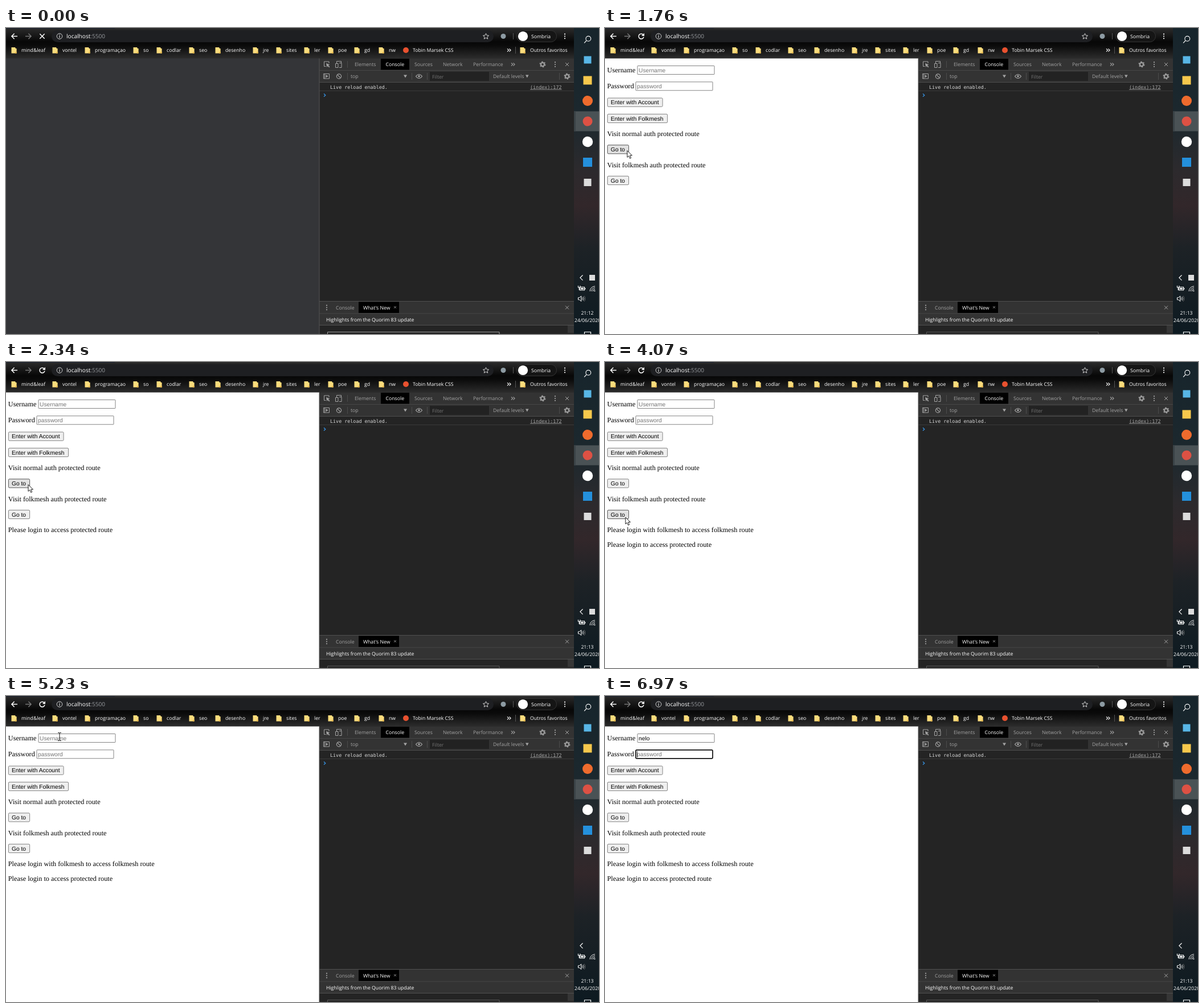
An HTML page that plays this animation: 1041x538 px, repeating every 8000 ms.

```html
<!DOCTYPE html>
<html lang="pt">
<head>
<meta charset="utf-8">
<title>Login routes</title>
<style>
html, body { margin: 0; width: 100%; height: 100%; overflow: hidden; background: #242424; }
svg { display: block; width: 100vw; height: 100vh; }
text { white-space: pre; text-rendering: geometricPrecision; }
.ui { font: 8.7px "Open Sans", "Noto Sans", sans-serif; }
.url { font: 10.1px "Open Sans", "Noto Sans", sans-serif; }
.mono { font: 8.4px "DejaVu Sans Mono", monospace; }
.page { font: 12.25px "Liberation Serif", "Times New Roman", serif; }
.form { font: 10.21px "Liberation Sans", Arial, sans-serif; }
</style>
</head>
<body>
<svg id="stage" viewBox="0 0 1041 538" preserveAspectRatio="none">
  <defs>
    <linearGradient id="toolbar" x2="0" y2="1">
      <stop stop-color="#2b2b2b"/><stop offset=".45" stop-color="#070707"/>
      <stop offset=".58" stop-color="#0b0b0b"/><stop offset="1" stop-color="#2c2c2c"/>
    </linearGradient>
    <linearGradient id="taskbar" x2="0" y2="1">
      <stop stop-color="#17252c"/><stop offset=".3" stop-color="#1c282e"/>
      <stop offset=".46" stop-color="#2c2a2d"/><stop offset=".58" stop-color="#32272a"/>
      <stop offset=".72" stop-color="#1d2226"/><stop offset="1" stop-color="#0d1a21"/>
    </linearGradient>
  </defs>
  <g id="page"></g>
  <g id="browser"></g>
  <g id="devtools"></g>
  <g id="desktop"></g>
  <g id="pointer"></g>
</svg>
<script>
const LOOP = 8000;
const $ = id => document.getElementById(id);

const rect = (x, y, w, h, fill, extra = "") =>
  `<rect x="${x}" y="${y}" width="${w}" height="${h}" fill="${fill}" ${extra}/>`;
const text = (x, y, str, cls = "ui", fill = "#fff", extra = "") =>
  `<text x="${x}" y="${y}" class="${cls}" fill="${fill}" ${extra}>${str.replace(/&/g, "&amp;")}</text>`;
const circle = (x, y, r, fill, extra = "") =>
  `<circle cx="${x}" cy="${y}" r="${r}" fill="${fill}" ${extra}/>`;
const line = (d, stroke, width = 1, fill = "none") =>
  `<path d="${d}" stroke="${stroke}" stroke-width="${width}" fill="${fill}"/>`;
const cross = (x, y, r, color, width = 1) =>
  line(`M${x - r} ${y - r}l${2 * r} ${2 * r}m0 ${-2 * r}l${-2 * r} ${2 * r}`, color, width);
const dots = (x, y, color, gap = 3.8) =>
  [-gap, 0, gap].map(dy => circle(x, y + dy, 1.1, color)).join("");
const gear = (x, y) =>
  circle(x, y, 3.1, "none", 'stroke="#9a9a9a" stroke-width="2.3"') +
  circle(x, y, 4.8, "none", 'stroke="#9a9a9a" stroke-width="1.4" stroke-dasharray="2.5 2.5265"');
const chevrons = (x, y, color) =>
  line(`M${x - 3} ${y - 2.6}l2.7 2.6l-2.7 2.6m3.4 -5.2l2.7 2.6l-2.7 2.6`, color, 1.1);
const folder = x => `<path d="M${x - 4.5} 34h6.5l1 2h1.6v8.6h-9.1z" fill="#fbdc7c"/>` +
  rect(x + 2, 42, 2.6, 2.6, "#e9b94d");
const divider = (x, y) => line(`M${x} ${y - 6}v12`, "#4c4c4c");

function drawBrowser() {
  const bookmarks = [["mind&leaf", 27], ["vontel", 99], ["programaçao", 156], ["so", 241],
    ["codlar", 282], ["seo", 339], ["desenho", 385], ["jre", 451], ["sites", 492],
    ["ler", 541], ["poe", 583], ["gd", 629], ["nw", 672], ["Outros favoritos", 920]];
  $("browser").innerHTML =
    rect(0, 0, 997, 53.5, "url(#toolbar)") +
    rect(0, 0, 191, 1, "#18202e") +
    rect(80, 4, 776, 21, "#1e1f22", 'rx="10.5"') +
    line("M20 14.5H10M14.6 9.8L9.9 14.5l4.7 4.7", "#fff", 1.5) +
    line("M34 14.5h10M39.4 9.8l4.7 4.7l-4.7 4.7", "#777", 1.5) +
    `<g id="stop">${cross(63.5, 14.5, 4.2, "#fff", 1.5)}</g>` +
    `<g id="reload">${line("M67.2 12A4.5 4.5 0 1 0 68 15.6", "#fff", 1.5)}
      <path d="M69 9v5h-5z" fill="#fff"/></g>` +
    circle(94, 14.5, 4.8, "none", 'stroke="#d5d5d5"') +
    rect(93.4, 13.6, 1.2, 3.7, "#ddd") + rect(93.4, 11.5, 1.2, 1.2, "#ddd") +
    text(106, 18, 'localhost<tspan fill="#96999d">:5500</tspan>', "url") +
    line("M842.5 9.6l1.5 3.3l3.6 .4l-2.7 2.4l.8 3.5l-3.2 -1.9l-3.2 1.9l.8 -3.5l-2.7 -2.4l3.6 -.4z", "#d0d0d0") +
    circle(873, 14.5, 4.5, "#8d9ba3") +
    line("M890.5 9v11", "#555") +
    rect(896.5, 4.5, 70, 20, "#151515", 'rx="10" stroke="#343434"') +
    circle(907.5, 14.5, 8.6, "#fff") +
    text(922, 17.7, "Sombria") + dots(981, 14.5, "#fff") +
    bookmarks.map(([name, x]) => folder(x - 13) + text(x, 42, name)).join("") +
    circle(702, 39, 5, "#e8512f") + text(714, 42, "Tobin Marsek CSS") +
    chevrons(883, 39, "#fff") + line("M894.5 33v12", "#555");
}

function drawDevtools() {
  const gray = "#a3a3a3";
  const tabs = [["Elements", 612], ["Console", 666.5], ["Sources", 717], ["Network", 767], ["Performance", 820]];
  $("devtools").innerHTML =
    rect(550, 53.5, 447, 484.5, "#242424") +
    rect(550, 53.5, 447, 42, "#333") +
    rect(550, 74, 447, 1, "#474747") + rect(550, 95, 447, 1, "#4c4c4c") +
    rect(658, 54, 50, 19.5, "#000") +
    tabs.map(([name, x]) => text(x, 67.4, name, "ui", name === "Console" ? "#fff" : gray)).join("") +
    line("M561.5 67.5h-3v-8.5h8.5v3", gray) +
    `<path d="M562 62l6.5 2.6l-2.7 1l2.6 2.7l-1.2 1.2l-2.6 -2.7l-1.1 2.5z" fill="${gray}"/>` +
    line("M580.5 62v-3.5h8v3M578.5 62.5h4.5v7h-4.5zM585 69.5h4v-8h-4", gray) +
    divider(599.5, 64) + chevrons(890, 64, gray) + gear(942, 64) +
    dots(964, 64, gray) + cross(985, 64, 3, gray) +
    // console toolbar
    line("M557.5 80.5h10v8.5h-10zM559.5 80.5v8.5", gray) +
    `<path d="M561.5 82l4 2.8l-4 2.8z" fill="${gray}"/>` +
    circle(584.5, 85, 4.1, "none", `stroke="${gray}" stroke-width="1.2"`) +
    line("M581.6 82.1l5.8 5.8", gray, 1.2) +
    [599.5, 712.5, 739.5, 971.5].map(x => divider(x, 85)).join("") +
    text(605, 88.3, "top", "ui", gray) +
    `<path d="M698 82.5h6l-3 5zM912 82.5h5.6l-2.8 5z" fill="${gray}"/>` +
    line("M719.5 85q5.5 -7 11 0q-5.5 7 -11 0z", gray, 1.2) + circle(725, 84.8, 1.8, gray) +
    rect(744, 77, 104, 16, "#222") + text(748, 88.6, "Filter", "ui", "#757575") +
    text(855, 88.3, "Default levels", "ui", gray) + gear(985, 85) +
    // console output
    text(569, 106.6, "Live reload enabled.", "mono", "#d8d8d8") +
    text(920, 106.6, "(index):172", "mono", "#a6a6a6", 'text-decoration="underline"') +
    rect(550, 110, 447, 1, "#3b3b3b") +
    line("M558 115.6l2.8 2.6l-2.8 2.6", "#3691e0", 1.3) +
    // drawer
    rect(550, 480, 447, 42, "#333") + rect(550, 480, 447, 1, "#505050") +
    rect(619, 481.5, 71, 19.5, "#000") + rect(550, 501.5, 447, 1, "#474747") +
    dots(563, 491.5, gray) + text(579, 494.8, "Console", "ui", gray) +
    text(627, 494.8, "What's New") + cross(683, 491, 2, "#888", .9) + cross(985, 491.5, 3, gray) +
    text(562, 515.7, "Highlights from the Quorim 83 update") +
    rect(550, 522, 447, 1, "#505050") + rect(986, 523, 11, 13, "#363636") +
    `<path id="card" d="M564.5 538v-3.5h301.5v3.5" fill="none"/>` +
    rect(549.5, 53.5, 1, 484.5, "#555");
}

function drawDesktop() {
  const square = (y, size, fill) => rect(1021 - size / 2, y - size / 2, size, size, fill);
  $("desktop").innerHTML =
    rect(997, 0, 44, 538, "url(#taskbar)") +
    rect(997, 146.5, 44, 35, "#4a5255") + rect(997, 146.5, 3, 35, "#3a4347") +
    circle(1022.3, 18.8, 4.4, "none", 'stroke="#fff" stroke-width="1.1"') +
    line("M1019.1 22.1l-4 4.2", "#fff", 1.2) +
    square(56, 13, "#58b6e6") + square(92, 15, "#f6c84c") +
    circle(1021, 128, 9, "#ee6b2d") + circle(1021, 164, 8.5, "#dd5144") +
    circle(1021, 200, 9.2, "#fff") + square(236, 16, "#2490dc") + square(271.5, 13, "#dcdcdc") +
    line("M1012.5 434.5l-4.6 4.6l4.6 4.6", "#fff", 1.2) +
    `<g id="tray">${rect(1024, 434, 10, 10, "#dcdcdc")}</g>` +
    line("M1007.5 455.5h8v5.5h-8z", "#fff", 1.1) + rect(1009, 457, 5, 2.6, "#fff") +
    rect(1016, 457, 1.2, 2.6, "#fff") + line("M1004.5 453v3.2h3.5v-3.2M1006.2 456v5", "#fff", 1.1) +
    line("M1025 463a9 9 0 0 1 9 -9M1027.7 463a6.3 6.3 0 0 1 6.3 -6.3M1030.3 463a3.7 3.7 0 0 1 3.7 -3.7", "#eee") +
    circle(1033.4, 462.3, 1, "#fff") +
    line("M1004.5 474h2.3l3 -2.8v9.4l-3 -2.8h-2.3z", "#fff") +
    line("M1011.5 473.8q1.4 2.1 0 4.2M1013.2 472.4q2.5 3.5 0 7", "#ddd", .9) +
    line("M1015 471q3.5 4.9 0 9.8", "#777", .9) +
    text(1020.5, 504, "", "ui", "#fff", 'id="clock" text-anchor="middle"') +
    text(998, 516.7, "24/06/2020") +
    line("M1015.5 538v-3.5h11v3.5", "#fff", 1.2);
}

const button = (y, w, label, hover) =>
  rect(4.4, y + .4, w - .8, 15.2, hover ? "#e2e2e2" : "#efefef",
    `rx="1.6" stroke="${hover ? "#444" : "#767676"}" stroke-width=".9"`) +
  text(10, y + 11.5, label, "form", "#000");

function field(x, y, hint, value, focus) {
  const ring = focus ? 'rx="1.8" stroke="#101010" stroke-width="1.7"' : 'rx=".6" stroke="#767676" stroke-width=".9"';
  const caretX = x + (value ? 22.7 : 2.7);
  return rect(x + .5, y + .5, 135, 15, "#fff", ring) +
    text(x + 2.6, y + 11.7, value || hint, "form", value ? "#000" : "#757575") +
    (focus ? rect(caretX, y + 2.4, .8, 11.2, "#000") : "");
}

function drawPage(t) {
  if (t < 880) return rect(0, 53, 550, 485, "#343538");
  const messages = [];
  if (t >= 2340) messages.unshift("Please login to access protected route");
  if (t >= 4070) messages.unshift("Please login with folkmesh to access folkmesh route");
  const label = (y, str) => text(3.8, y, str, "page", "#000");
  return rect(0, 53, 550, 485, "#fff") +
    label(77.5, "Username") + field(56.5, 66, "Username", t >= 5800 ? "nelo" : "", t >= 5800 && t < 6970) +
    label(106, "Password") + field(53.5, 94.3, "password", "", t >= 6970) +
    button(122.7, 97.5, "Enter with Account") +
    button(151, 106, "Enter with Folkmesh") +
    label(190, "Visit normal auth protected route") +
    button(205.4, 38, "Go to", t >= 1760 && t < 3490) +
    label(244.5, "Visit folkmesh auth protected route") +
    button(260, 38, "Go to", t >= 3490 && t < 4650) +
    messages.map((str, i) => label(299 + i * 26, str)).join("");
}

const arrow = (x, y) => `<path transform="translate(${x} ${y})"
  d="M.5 .6V12.4L3.2 9.9L5.2 14.4L7.2 13.5L5.3 9.1H9z" fill="#fff" stroke="#000" stroke-width=".9"/>`;
const beam = y => line(`M91 ${y + .5}h2.3l.7 .7l.7 -.7H97M94 ${y + 1}v13M91 ${y + 14.5}h2.3l.7 -.7l.7 .7H97`, "#000", .9);

// Each step holds until the next one begins.
const pointerSteps = [
  [0, ""], [880, arrow(50, 215)], [1760, arrow(38.5, 215)], [3490, arrow(39.5, 262)],
  [4070, arrow(35.5, 272.5)], [4650, beam(66)], [5230, beam(64)], [5800, ""],
];
const changes = [0, 880, 1760, 2340, 3490, 4070, 4650, 5230, 5800, 6970];
let shown = -1;

function render(t) {
  const step = changes.filter(start => start <= t).length;
  if (step === shown) return;
  shown = step;
  const loading = t < 880;
  $("page").innerHTML = drawPage(t);
  $("pointer").innerHTML = pointerSteps.filter(([start]) => start <= t).pop()[1];
  $("stop").style.display = loading ? "" : "none";
  $("reload").style.display = loading ? "none" : "";
  $("tray").style.display = t < 4650 ? "" : "none";
  $("clock").textContent = loading ? "21:12" : "21:13";
  $("card").setAttribute("stroke", loading ? "#a0a0a0" : "#585858");
}

drawBrowser();
drawDevtools();
drawDesktop();
const origin = performance.now();
function tick() {
  render((performance.now() - origin) % LOOP);
  requestAnimationFrame(tick);
}
tick();
</script>
</body>
</html>
```
